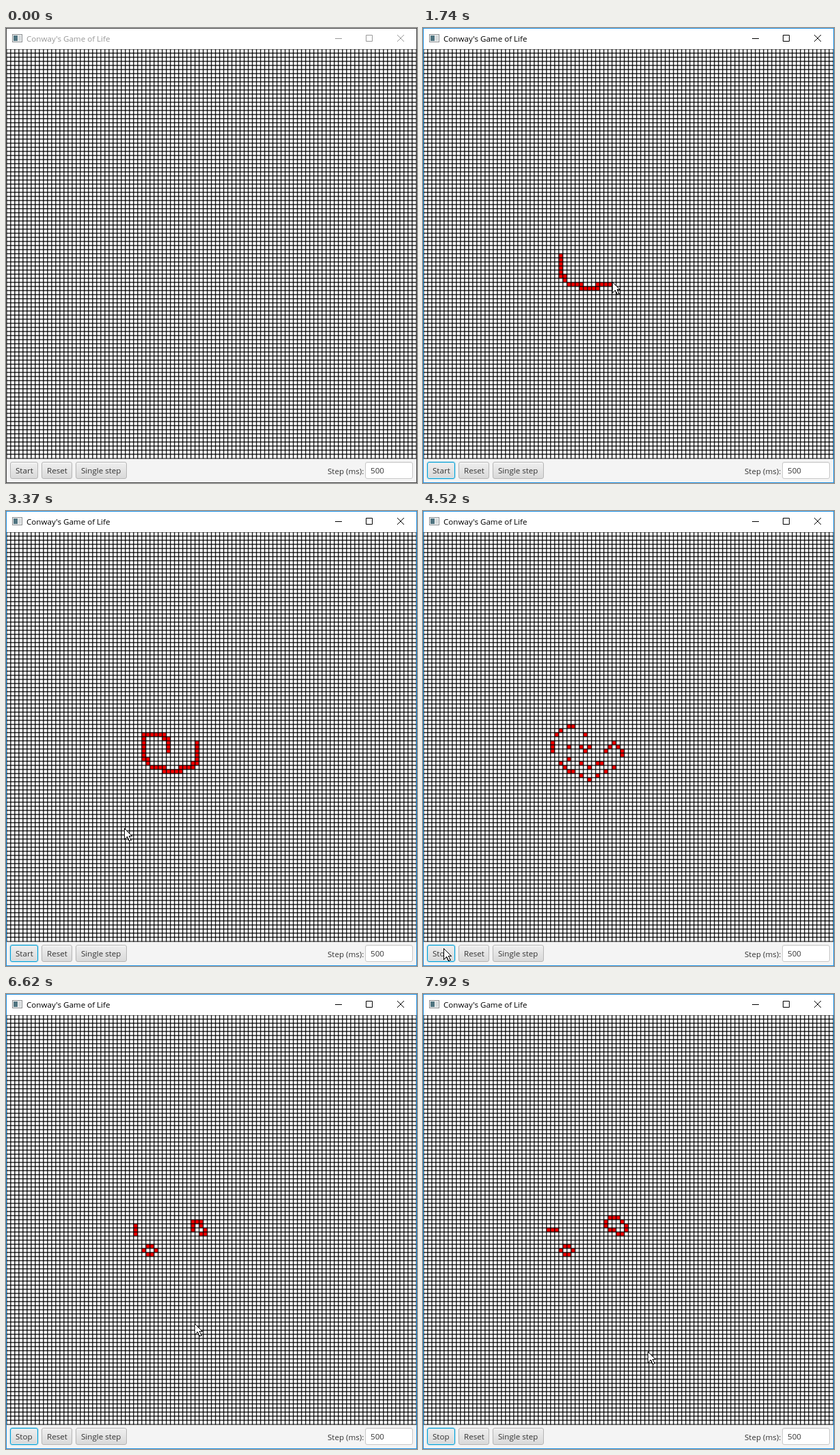
These frames come from a looping animation (602x667 px, 8 s). An HTML page with a canvas:

```html
<!DOCTYPE html>
<html lang="en">
<head>
<meta charset="utf-8">
<title>Conway's Game of Life</title>
<style>
html, body { margin: 0; width: 100%; height: 100%; overflow: hidden; }
#win { position: relative; width: 602px; height: 667px; overflow: hidden; background: #f4f4f4;
  font: 11.6px/25px "Open Sans", "Noto Sans", sans-serif; color: #333; white-space: nowrap; }
#win > * { position: absolute; box-sizing: border-box; }
#bar { left: 0; top: 0; width: 602px; height: 31px; background: #fff; }
#title { left: 30px; top: 3px; color: #999; }
#grid { left: 1px; top: 31px; }
#icons { left: 0; top: 0; color: #999; }
#frame { inset: 0; border: 1px solid #444; }
.btn { top: 636px; height: 25px; padding-left: 7px; line-height: 23px; border: 1px solid #b5b5b5;
  border-radius: 3px; background: linear-gradient(#efefef, #d9d9d9); box-shadow: inset 0 1px #fafafa; }
#field { left: 526px; top: 636px; width: 70px; height: 25px; padding-left: 7px; line-height: 23px;
  border: 1px solid #c8c8c8; border-radius: 3px; background: #fff; box-shadow: inset 0 1px 1px #eee; }
.active #title, .active #icons { color: #000; }
.active #frame { border-color: #1c8fe3; }
.active #start { border-color: #039ed3; box-shadow: inset 0 0 0 1px #cbe6f0, 0 0 0 1px #d0e7f0; }
.hover #start { background: linear-gradient(#fafafa, #e4e4e4); }
#cursor { left: 0; top: 0; }
</style>
</head>
<body>
<div id="win">
  <div id="bar"></div>
  <div id="title">Conway's Game of Life</div>
  <svg id="icons" width="602" height="31" fill="none" stroke="currentColor">
    <rect x="9.5" y="9.5" width="14" height="11" fill="#f4f4f4" stroke="#8b8f92"/>
    <path d="M11 11h6v8h-6z" fill="#4f7480" stroke="none"/>
    <path d="M18 11h4v8h-4z" fill="#d5dadc" stroke="none"/>
    <path d="M482 15.5h10M527.5 10.5h9v9h-9zM573 10l10 10M583 10l-10 10"/>
  </svg>
  <canvas id="grid" width="600" height="601"></canvas>
  <div class="btn" id="start" style="left:6px;width:41px">Start</div>
  <div class="btn" style="left:52px;width:45px">Reset</div>
  <div class="btn" style="left:102px;width:75px">Single step</div>
  <div style="left:471px;top:637px">Step (ms):</div>
  <div id="field">500</div>
  <div id="frame"></div>
  <svg id="cursor" width="12" height="19">
    <path d="M.5 .5V16.5L4.5 12.5 7.5 18.5H8.5L10.3 17.5 7.4 11.5H11.5Z" fill="#fff" stroke="#000"
      stroke-linejoin="round" shape-rendering="crispEdges"/>
  </svg>
</div>
<script>
const LOOP = 8000, SIZE = 6, N = 100;
const ENTER = 130, ACTIVATE = 960, HOVER = 3840, CLICK = 4210;
const CLOCK = 3545, STEP = 483; // simulation clock start and period
const $ = id => document.getElementById(id);
const win = $('win'), start = $('start'), cursor = $('cursor');
const ctx = $('grid').getContext('2d');

// A hand-drawn stroke: a start cell followed by unit moves at a steady pace
const MOVES = { u: [0, -1], d: [0, 1], l: [-1, 0], r: [1, 0], x: [1, 1] };
function stroke(t, pace, x, y, moves) {
  const marks = [{ t, x, y }];
  for (const m of moves)
    marks.push({ t: t += pace, x: x += MOVES[m][0], y: y += MOVES[m][1] });
  return marks;
}
const bowl = stroke(980, 37, 33, 50, 'dddddrdxrrrdrrrrurrruruuuuu');
const hook = stroke(2505, 43, 39, 53, 'uuululllll');
const marks = [...bowl, ...hook];
const cellsAt = t => marks.filter(m => m.t <= t).map(m => m.y * N + m.x);

// The pointer follows the strokes and a few waypoints between them
const follow = list => list.map(m => [m.t, m.x * SIZE + 7, m.y * SIZE + 33]);
const path = [
  [ENTER, 103, 655], [520, 230, 411], [900, 205, 333],
  ...follow(bowl), ...follow(hook),
  [3140, 237, 345], [3370, 173, 465], [3910, 30, 641], [4520, 30, 641],
  [5610, 19, 649], [6070, 225, 521], [6450, 276, 483], [6620, 276, 483],
  [6850, 337, 500], [7400, 85, 631], [7800, 329, 524]
];
function pointer(t) {
  const i = path.findIndex(p => p[0] > t);
  if (i < 1) return path[i ? path.length - 1 : 0].slice(1);
  const [t0, x0, y0] = path[i - 1], [t1, x1, y1] = path[i];
  const f = (t - t0) / (t1 - t0);
  return [x0 + (x1 - x0) * f, y0 + (y1 - y0) * f];
}

function evolve(cells) {
  const live = new Set(cells), count = new Map();
  for (const c of live)
    for (const dy of [-N, 0, N])
      for (const dx of [-1, 0, 1])
        if (dx || dy) count.set(c + dx + dy, (count.get(c + dx + dy) || 0) + 1);
  return [...count].filter(([c, n]) => n === 3 || (n === 2 && live.has(c))).map(e => e[0]);
}
const generationAt = t => t < CLICK ? 0 : Math.floor((t - CLOCK) / STEP);
const generations = [cellsAt(LOOP)];
while (generations.length <= generationAt(LOOP)) generations.push(evolve(generations.at(-1)));

// Integer-aligned outlines give the soft two-pixel grid lines
const empty = document.createElement('canvas');
empty.width = 600;
empty.height = 601;
const pen = empty.getContext('2d');
pen.fillStyle = '#fff';
for (let y = 0; y < N; y++)
  for (let x = 0; x < N; x++) {
    pen.fillRect(x * SIZE, y * SIZE, SIZE, SIZE);
    pen.strokeRect(x * SIZE, y * SIZE, SIZE, SIZE);
  }

let shown;
function drawCells(cells) {
  const key = cells.join();
  if (key === shown) return;
  shown = key;
  ctx.globalCompositeOperation = 'source-over';
  ctx.clearRect(0, 0, 600, 601);
  ctx.drawImage(empty, 0, 0);
  ctx.globalCompositeOperation = 'multiply';
  ctx.fillStyle = '#f00';
  for (const c of cells) ctx.fillRect(c % N * SIZE, Math.floor(c / N) * SIZE, SIZE, SIZE);
}

function render(now) {
  const t = now % LOOP, gen = generationAt(t);
  drawCells(gen ? generations[gen] : cellsAt(t));
  win.classList.toggle('active', t >= ACTIVATE);
  win.classList.toggle('hover', t >= HOVER && t < CLICK);
  start.textContent = gen ? 'Stop' : 'Start';
  const [x, y] = pointer(t).map(Math.round);
  cursor.style.visibility = t < ENTER ? 'hidden' : 'visible';
  cursor.style.transform = `translate(${x}px, ${y}px)`;
  requestAnimationFrame(render);
}
render(0);
</script>
</body>
</html>
```
